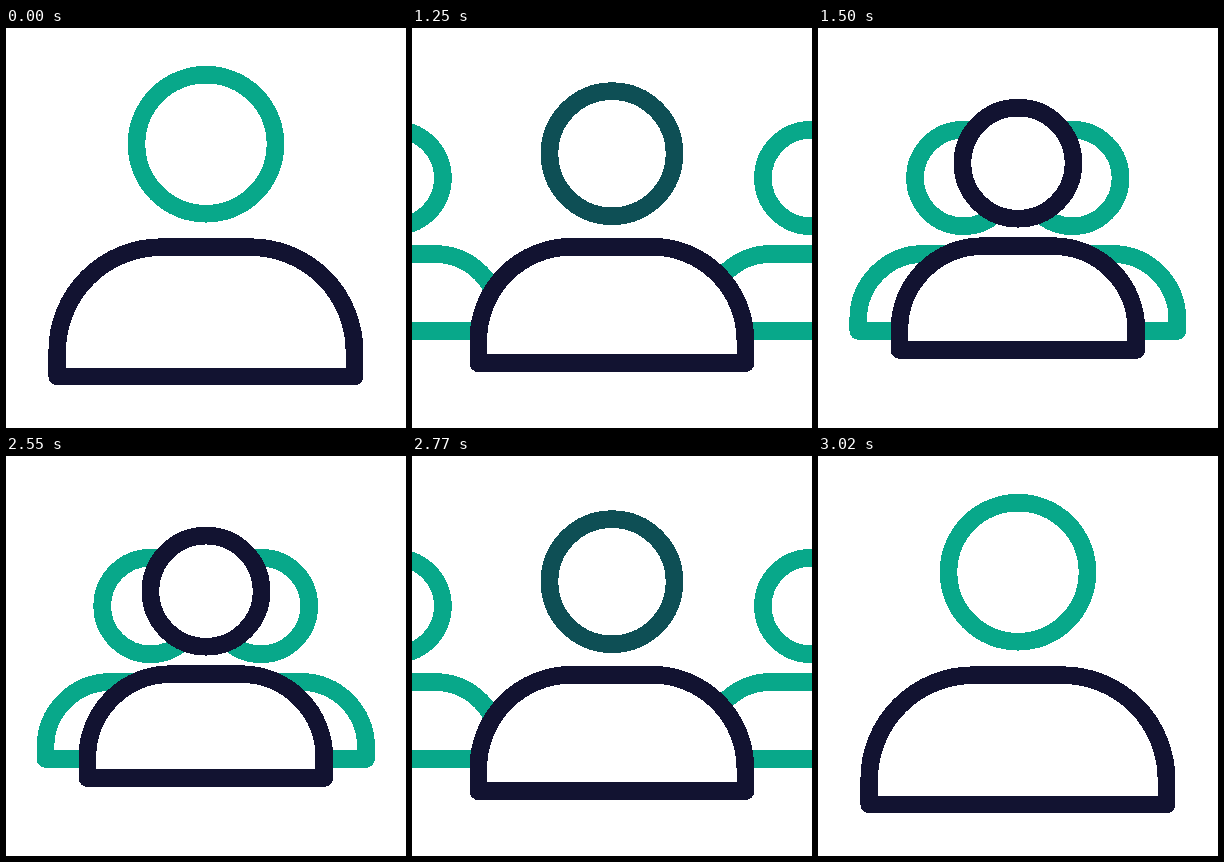
An HTML page for the animation above (3.05 s loop, 400 px wide and 400 px high).

```html
<!DOCTYPE html>
<html lang="en">
<head>
<meta charset="utf-8">
<title>Person to group</title>
<style>
  html, body { margin: 0; width: 100%; height: 100%; overflow: hidden; background: #fff; }
  svg { display: block; width: 100%; height: 100%; }
</style>
</head>
<body>
<svg viewBox="0 0 400 400" fill="#fff" stroke-width="17.7" stroke-linejoin="round" shape-rendering="crispEdges">
  <g id="left" stroke="#08a88a">
    <circle cy="150" r="48.25"/>
    <path d="M-105 303V291A65 65 0 0 1-40 226H40A65 65 0 0 1 105 291V303Z"/>
  </g>
  <g id="right" stroke="#08a88a">
    <circle cy="150" r="48.25"/>
    <path d="M-105 303V291A65 65 0 0 1-40 226H40A65 65 0 0 1 105 291V303Z"/>
  </g>
  <circle id="head" cx="200"/>
  <path id="body" stroke="#121331"/>
</svg>
<script>
const LOOP = 3050, STEP = 25, MOVE = 500, OPEN = 1000, CLOSE = 2525;
const GREEN = [8, 168, 138], NAVY = [18, 19, 49];
const [left, right, head, body] =
  ['left', 'right', 'head', 'body'].map(id => document.getElementById(id));

const mix = (a, b, p) => a + (b - a) * p;
const clamp = x => Math.min(1, Math.max(0, x));

// cubic-bezier(.6, 0, .4, 1), solved by bisection
function ease(x) {
  if (x <= 0 || x >= 1) return clamp(x);
  let lo = 0, hi = 1;
  for (let i = 0; i < 30; i++) {
    const s = (lo + hi) / 2, r = 1 - s;
    if (1.8 * s * r * r + 1.2 * s * s * r + s * s * s < x) lo = s;
    else hi = s;
  }
  return lo * lo * (3 - 2 * lo);
}

function shoulders(half, top, radius, bottom) {
  const l = 199.85 - half, r = 199.85 + half, y = top + radius;
  return `M${l} ${bottom}V${y}A${radius} ${radius} 0 0 1 ${l + radius} ${top}` +
    `H${r - radius}A${radius} ${radius} 0 0 1 ${r} ${y}V${bottom}Z`;
}

function draw(ms) {
  // 40 steps a second, shown on a 10 ms clock
  const t = Math.floor((ms % LOOP + 5) / STEP) * STEP;
  const p = ease((t - OPEN) / MOVE) - ease((t - CLOSE) / MOVE);
  const tint = p * (1.4 - 0.4 * p);

  left.setAttribute('transform', `translate(${mix(-180, 145.3, p)})`);
  right.setAttribute('transform', `translate(${mix(544, 254.3, p)})`);
  head.setAttribute('cy', mix(116.2, 135.2, p));
  head.setAttribute('r', mix(69.5, 55.5, p));
  head.setAttribute('stroke', `rgb(${GREEN.map((g, i) => Math.round(mix(g, NAVY[i], tint)))})`);
  body.setAttribute('d', shoulders(
    mix(148.6, 118.4, p), mix(219.2, 218.2, p), mix(104, 83, p), mix(348.5, 322, p)));
}

const start = performance.now();
function tick() {
  draw(performance.now() - start);
  requestAnimationFrame(tick);
}
tick();
</script>
</body>
</html>
```
